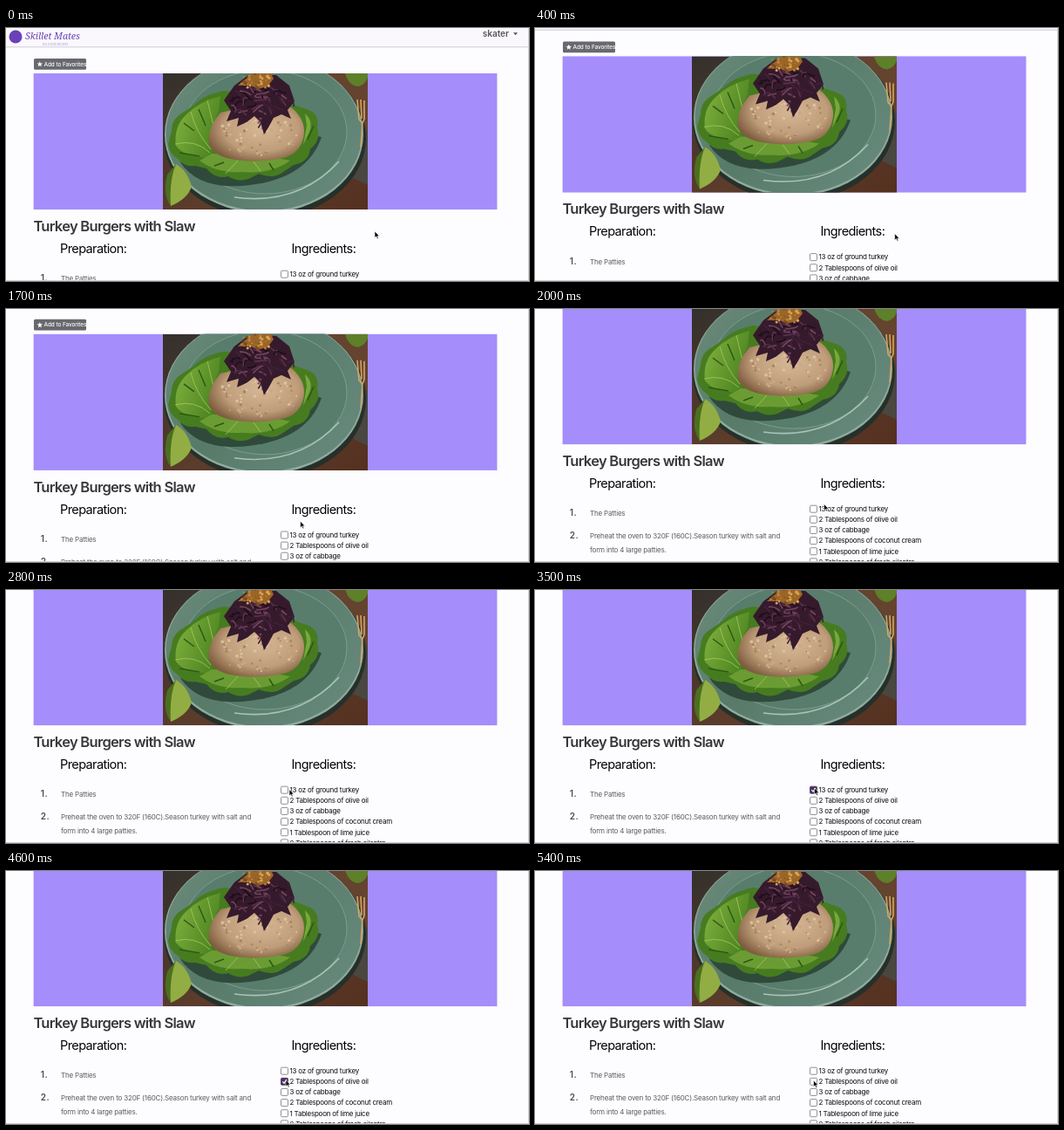
These frames come from a looping animation (600x290 px, 5500 ms). An HTML page:

```html
<!DOCTYPE html>
<html lang="en">
<head>
<meta charset="utf-8">
<title>Recipe page</title>
<style>
  html, body { margin: 0; width: 100%; height: 100%; overflow: hidden; background: #fdfcff; }
  svg { display: block; width: 600px; height: 290px; }
  text { font-family: Inter, "Open Sans", sans-serif; white-space: pre; }
  .title { font-size: 16.5px; font-weight: 600; letter-spacing: -.043em; fill: #38383c; }
  .head { font-size: 14.5px; letter-spacing: -.041em; fill: #050505; }
  .item { font-size: 8px; letter-spacing: -.029em; fill: #0c0c0e; }
  .step { font-size: 8px; letter-spacing: -.0235em; fill: #5a5a5e; }
  .num { font-size: 10px; font-weight: 600; letter-spacing: .04em; fill: #4c4c50; }
  .btn { font-size: 6.4px; font-weight: 500; letter-spacing: -.008em; fill: #fff; }
  .user { font-size: 10px; font-weight: 600; fill: #555; }
  .brand { font: italic 10.5px "Noto Serif", serif; fill: #6a41b8; }
  .tag { font-size: 3px; fill: #a58fd6; }
</style>
</head>
<body>
<svg viewBox="0 0 600 290">
  <defs>
    <clipPath id="crop"><rect x="180" y="52" width="235" height="156.1"/></clipPath>
    <linearGradient id="table" x1="0" y1="0" x2="1" y2="1">
      <stop offset="0" stop-color="#33302c"/>
      <stop offset=".55" stop-color="#5c3c2b"/>
      <stop offset="1" stop-color="#54301f"/>
    </linearGradient>
    <linearGradient id="plate" x1="0" y1="0" x2="1" y2=".6">
      <stop offset="0" stop-color="#6d8d7d"/>
      <stop offset=".5" stop-color="#577a69"/>
      <stop offset="1" stop-color="#64877a"/>
    </linearGradient>
    <linearGradient id="leaf" x1="0" y1="0" x2="1" y2=".5">
      <stop offset="0" stop-color="#86b441"/>
      <stop offset="1" stop-color="#4c8520"/>
    </linearGradient>
    <radialGradient id="meat" cx=".55" cy=".45" r=".6">
      <stop offset="0" stop-color="#d6b795"/>
      <stop offset=".65" stop-color="#bf9d7a"/>
      <stop offset="1" stop-color="#7f5e40"/>
    </radialGradient>
  </defs>
  <rect width="600" height="290" fill="#fdfcff"/>
  <g id="page">
    <rect width="600" height="21.5" fill="#faf8fd"/>
    <rect y="21.3" width="600" height="1" fill="#cfcdd3"/>
    <circle cx="11" cy="10" r="7.5" fill="#6a41b8"/>
    <text class="brand" x="22" y="13">Skillet Mates</text>
    <text class="tag" x="42" y="20">DELICIOUS RECIPES</text>
    <text class="user" x="577" y="10.3" text-anchor="end">skater</text>
    <path d="M582 5.2h5l-2.5 3z" fill="#555"/>

    <rect x="32" y="35" width="60" height="12.8" rx="1.5" fill="#68696e"/>
    <path id="star" fill="#fff"/>
    <text class="btn" x="43.5" y="43.7">Add to Favorites</text>

    <rect x="31.6" y="52" width="531.8" height="156.1" fill="#a58dfb"/>
    <g clip-path="url(#crop)">
      <rect x="180" y="52" width="235" height="157" fill="url(#table)"/>
      <path d="M340 52H415V150L400 100Z" fill="#64432f"/>
      <path d="M404 125L415 116V180L398 172Z" fill="#4a4640"/>
      <ellipse cx="297" cy="126" rx="116" ry="92" fill="#26302a"/>
      <ellipse cx="296" cy="122" rx="114" ry="90" fill="#8eab9c"/>
      <ellipse cx="296" cy="121" rx="112.5" ry="88.5" fill="url(#plate)"/>
      <ellipse cx="297" cy="119" rx="94" ry="71" fill="#587d6c" stroke="#7c9d8e"/>
      <path d="M262 194Q335 204 382 153" fill="none" stroke="#a8c4b6" stroke-width="1.6"/>
      <path d="M200 154Q222 187 280 180Q346 172 362 125L300 110Z" fill="#2f4a3b"/>
      <path d="M250 72Q226 77 216 88L203 97Q190 104 190 118L186 133Q188 145 197 150Q205 160 217 158L230 161Q240 174 255 170Q266 177 278 173L290 167Q307 174 318 165L330 157Q347 154 349 139Q362 128 357 114Q360 98 345 93L300 78Z" fill="#467c1f"/>
      <path d="M246 78Q222 84 207 99Q192 113 195 135Q206 150 239 148Q228 125 244 96Z" fill="url(#leaf)"/>
      <path d="M222 152Q242 167 270 165Q304 168 326 152L300 147L236 144Z" fill="#6b9c33"/>
      <path d="M343 98Q353 107 348 119L341 134L345 112Z" fill="#78a83c"/>
      <path d="M212 96Q218 120 235 139M194 133Q217 127 234 143M231 83L238 112M252 167L266 152M292 164L284 153" fill="none" stroke="#a6c865" stroke-width=".8"/>
      <path d="M204 109L216 118M199 143L222 147M221 93L229 112M239 158L250 154M307 163L302 155M353 112L346 128" fill="none" stroke="#2d5814" stroke-width="1.5"/>
      <path d="M246 97Q230 115 233 133Q238 148 264 151Q286 155 312 150Q333 148 340 130Q346 113 335 99Q325 85 306 84Z" fill="url(#meat)"/>
      <g id="crumb"></g>
      <path d="M250 83L262 66L278 54H310L325 66L331 84L323 94L327 104L316 99L307 103L301 114L296 122L292 108L285 101L276 108L265 113L267 103L253 107L258 95Z" fill="#351a2c"/>
      <g id="slaw" fill="none"></g>
      <path d="M266 66L274 59L284 52H304L307 58L300 67L289 70L281 66Z" fill="#9b6528"/>
      <g id="nuts"></g>
      <path d="M195 156Q208 163 213 182Q208 196 189 204Q180 180 195 156Z" fill="#92ad43"/>
      <path d="M195 156Q187 175 189 204Q179 191 185 168Z" fill="#4a7020"/>
      <path d="M389 52Q393 66 404 67Q412 65 415 57V52Z" fill="#5d8029"/>
      <path d="M403 82L405 105L409 109L407 137M407 82L408 104M411 83L411 104L409 109" fill="none" stroke="#d3a562" stroke-width="1.6"/>
    </g>

    <text class="title" x="31.4" y="233">Turkey Burgers with Slaw</text>
    <text class="head" x="62" y="257.8">Preparation:</text>
    <text class="head" x="327.5" y="257.8">Ingredients:</text>
    <text class="num" x="39.8" y="290.2">1.</text>
    <text class="step" x="63" y="290.1">The Patties</text>
    <text class="num" x="39.8" y="316.2">2.</text>
    <text class="step" x="63" y="315.8">Preheat the oven to 320F (160C).Season turkey with salt and</text>
    <text class="step" x="63" y="331.8">form into 4 large patties.</text>
    <g id="list"></g>
  </g>
  <path d="M0 289.5H599.5V0" fill="none" stroke="#d2d0d5"/>
  <path id="cursor" d="M0 0V7.4L1.7 5.8L2.9 8.5L4.2 7.9L3 5.4H5.3Z" fill="#000" stroke="#fff" stroke-width=".6"/>
</svg>
<script>
const LOOP = 5500, STEP = 100;
const $ = id => document.getElementById(id);

let seed = 7;
const rnd = (a, b) => {
  seed = (seed * 16807) % 2147483647;
  return a + (b - a) * seed / 2147483647;
};

function add(parent, tag, attrs, text = '') {
  const el = document.createElementNS('http://www.w3.org/2000/svg', tag);
  for (const k in attrs) el.setAttribute(k, attrs[k]);
  el.textContent = text;
  parent.appendChild(el);
  return el;
}

// random point inside an ellipse
function spot(cx, cy, rx, ry) {
  const a = rnd(0, 2 * Math.PI), r = Math.sqrt(rnd(0, 1));
  return [cx + rx * r * Math.cos(a), cy + ry * r * Math.sin(a)];
}

function dots(id, n, area, colors) {
  for (let i = 0; i < n; i++) {
    const [cx, cy] = spot(...area);
    add($(id), 'circle', { cx, cy, r: rnd(.7, 1.9), fill: colors[i % colors.length] });
  }
}

dots('crumb', 70, [288, 123, 47, 24], ['#dcc19f', '#a98663', '#c9a983']);
dots('nuts', 34, [287, 61, 19, 9], ['#d6a355', '#7d4c20', '#bb8440']);
for (let i = 0; i < 44; i++) {
  const [x, y] = spot(290, 85, 36, 21);
  const d = `M${x} ${y}q${rnd(-9, 9)} ${rnd(-7, 4)} ${rnd(-14, 14)} ${rnd(2, 11)}`;
  add($('slaw'), 'path', { d, stroke: ['#5c3150', '#1f0e1b', '#75455f', '#41203a'][i % 4], 'stroke-width': 1.6 });
}

let star = '';
for (let i = 0; i < 10; i++) {
  const r = i % 2 ? 1.5 : 3.4, a = i * Math.PI / 5;
  star += `${i ? 'L' : 'M'}${38.8 + r * Math.sin(a)} ${41.6 - r * Math.cos(a)}`;
}
$('star').setAttribute('d', star + 'Z');

const items = ['13 oz of ground turkey', '2 Tablespoons of olive oil', '3 oz of cabbage',
  '2 Tablespoons of coconut cream', '1 Tablespoon of lime juice', '2 Tablespoons of fresh cilantro'];
const boxes = items.map((label, i) => {
  const y = 282.2 + i * 12.13;
  const box = add($('list'), 'rect', { x: 315.5, y: y - 4, width: 8, height: 8, rx: 1.2, 'stroke-width': .8 });
  const tick = add($('list'), 'path', { d: `M317.3 ${y}l1.7 1.9l3-4`, fill: 'none', stroke: '#fff', 'stroke-width': 1.2 });
  add($('list'), 'text', { class: 'item', x: 325.5, y: y + 2.8 }, label);
  return { box, tick };
});

// [time, values...] with eased travel between rows
const scroll = [[100, 0], [500, 23.2], [1700, 23.2], [2000, 53]];
const pointer = [[200, 423, 233], [1100, 341.3, 255], [1500, 341, 254], [2000, 331.5, 223.5], [2300, 331.5, 223.5],
  [2800, 325, 228.5], [3200, 320.5, 227], [3900, 320.5, 227], [4300, 321, 239.5], [4700, 321, 239.5], [5100, 319.5, 240]];
const checked = [[3300, 3900], [4400, 5100]];

function at(track, t) {
  const n = track.findIndex(row => row[0] > t);
  if (n === 0) return track[0].slice(1);
  if (n < 0) return track[track.length - 1].slice(1);
  const a = track[n - 1], b = track[n];
  const u = (t - a[0]) / (b[0] - a[0]), e = u * u * (3 - 2 * u);
  return a.slice(1).map((v, i) => v + (b[i + 1] - v) * e);
}

function draw(t) {
  $('page').setAttribute('transform', `translate(0 ${-at(scroll, t)[0]})`);
  $('cursor').setAttribute('transform', `translate(${at(pointer, t)})`);
  boxes.forEach(({ box, tick }, i) => {
    const on = i < checked.length && t >= checked[i][0] && t < checked[i][1];
    box.setAttribute('fill', on ? '#4a2f63' : '#fff');
    box.setAttribute('stroke', on ? '#4a2f63' : '#77757c');
    tick.setAttribute('visibility', on ? 'visible' : 'hidden');
  });
}

function loop() {
  const t = performance.now() % LOOP;
  draw(Math.floor(t / STEP) * STEP);
  requestAnimationFrame(loop);
}
loop();
</script>
</body>
</html>
```
